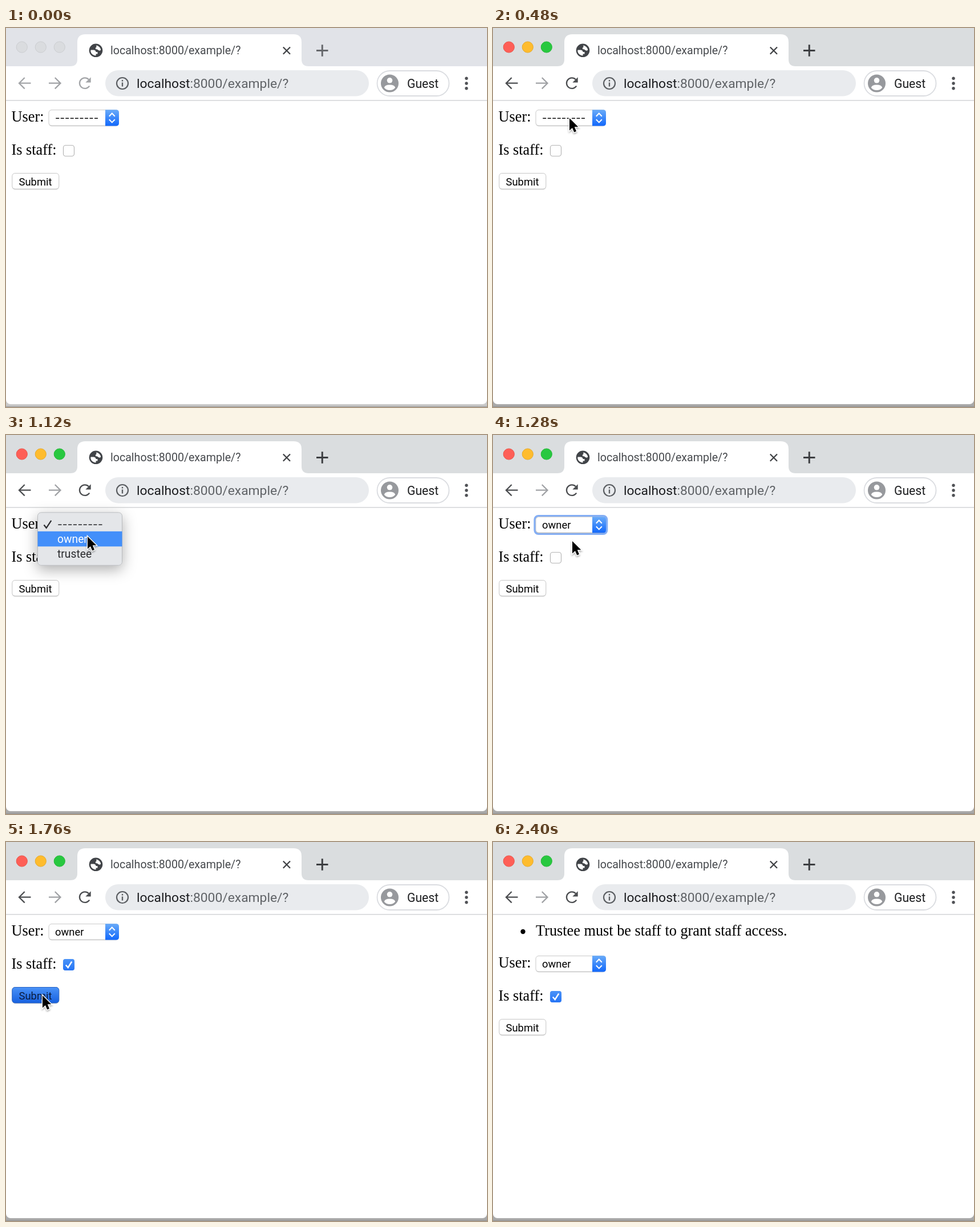
Write an HTML page that moves like this. It is 843 by 664 pixels and loops after 2.56 s.

```html
<!DOCTYPE html>
<html lang="en">
<head>
<meta charset="utf-8">
<title>Form validation</title>
<style>
  html, body { margin: 0; width: 100%; height: 100%; overflow: hidden; background: #fff; }
  svg { display: block; width: 843px; height: 664px; }
  text { font-family: Roboto, sans-serif; white-space: pre; }
  .serif { font: 26.3px "Liberation Serif", serif; }
  .field { font-size: 18.4px; }
  .item { font-size: 19.3px; fill: #2b2c2f; }
  .dash { font-family: Inter, sans-serif; }
  .line { fill: none; stroke-linecap: butt; stroke-linejoin: miter; }
  .dim { --strip: #e1e3e8; --nav: #a3a5a8; --plus: #66686c; --edge: #c9c9c9; }
  .lit { --strip: #dadddf; --nav: #4b4d50; --plus: #3c3e41; --edge: #a9a9a9; }
</style>
</head>
<body>
<svg id="stage" class="dim" viewBox="0 0 843 664">
  <defs>
    <linearGradient id="blue" x2="0" y2="1"><stop stop-color="#69abf9"/><stop offset="1" stop-color="#1268fb"/></linearGradient>
    <linearGradient id="tick" x2="0" y2="1"><stop stop-color="#4a93f8"/><stop offset="1" stop-color="#2574f5"/></linearGradient>
    <linearGradient id="press" x2="0" y2="1"><stop stop-color="#4a92f7"/><stop offset="1" stop-color="#1761e0"/></linearGradient>
    <filter id="lift" x="-50%" y="-50%" width="200%" height="220%"><feDropShadow dx="0" dy="7" stdDeviation="12" flood-opacity=".32"/></filter>
    <filter id="soft" x="-50%" y="-50%" width="200%" height="200%"><feDropShadow dx="0" dy="2" stdDeviation="1.5" flood-opacity=".35"/></filter>
    <clipPath id="win"><rect y="-9" width="843" height="668" rx="8"/></clipPath>
  </defs>

  <rect width="843" height="664" fill="var(--edge)"/>
  <rect y="662.5" width="843" height="1.5" fill="#8d8d8d" opacity=".6"/>
  <rect y="-9" width="843" height="668" rx="8" fill="#fff"/>

  <g clip-path="url(#win)">
    <rect width="843" height="67" fill="var(--strip)"/>
    <path d="M113 67Q125 67 125 55V25Q125 11 139 11H504Q518 11 518 25V55Q518 67 530 67Z" fill="#fff"/>
    <rect y="126" width="843" height="1.8" fill="#dadbdd"/>
  </g>
  <g id="lights"></g>

  <circle cx="157.5" cy="39.3" r="11.8" fill="#414448"/>
  <path d="M148.5 38.5H154Q157.5 39 157.5 42H160.5V45.5H157.5V48.5Q150 48 148.3 41ZM158 30.5Q164.5 31.5 166.3 38Q165 41 162 39Q160.5 37 157 37V34.5Q159.5 34 158 30.5Z" fill="#fff"/>
  <text x="183" y="46" font-size="19.6" fill="#46494d">localhost:8000/example/?</text>
  <path class="line" d="M485.8 33.5L498 45.7M498 33.5L485.8 45.7" stroke="#414346" stroke-width="2.3"/>
  <path class="line" d="M544 39.5H564.5M554.25 29.3V49.7" stroke="var(--plus)" stroke-width="3"/>

  <g class="line" stroke-width="2.3">
    <path d="M43.5 96.7H23.5M32.7 87L23 96.7L32.7 106.4" stroke="var(--nav)"/>
    <path d="M75 96.7H95M85.8 87L95.5 96.7L85.8 106.4" stroke="#a0a2a5"/>
    <path d="M146.2 101.5A9.3 9.3 0 1 1 145 90.2" stroke="var(--nav)"/>
  </g>
  <path d="M148.7 86.3V95.6H139.4Z" fill="var(--nav)"/>

  <rect x="174" y="74" width="462" height="45.5" rx="22.75" fill="#e9ebee"/>
  <circle class="line" cx="204" cy="97" r="10" stroke="#5b5e62" stroke-width="2.2"/>
  <path class="line" d="M204 95.5V102.5M204 91V93.4" stroke="#5b5e62" stroke-width="2.3"/>
  <text x="229" y="105" font-size="22.85" fill="#606367"><tspan fill="#1c1d20">localhost</tspan>:8000/example/?</text>

  <rect x="650.5" y="75" width="126" height="44" rx="22" fill="#fff" stroke="#dadce0" stroke-width="1.8"/>
  <circle cx="672.5" cy="97" r="15.5" fill="#97999d"/>
  <circle cx="672.5" cy="91.8" r="4.8" fill="#fff"/>
  <path d="M662.8 104.5Q664 99.5 672.5 99.5T682.2 104.5Q678.5 109 672.5 109T662.8 104.5Z" fill="#fff"/>
  <text x="703" y="104.8" font-size="21.2" fill="#1d1e20">Guest</text>
  <g fill="#505256"><circle cx="807" cy="88.3" r="2.7"/><circle cx="807" cy="97" r="2.7"/><circle cx="807" cy="105.7" r="2.7"/></g>

  <g id="error">
    <circle cx="52.5" cy="157" r="4.2"/>
    <text class="serif" x="75" y="164">Trustee must be staff to grant staff access.</text>
  </g>

  <g id="form">
    <text class="serif" x="9.5" y="164">User:</text>
    <rect id="ring" x="73.2" y="141.7" width="126.3" height="31.6" rx="6.5" fill="#fff" stroke="#84aef4" stroke-width="3.6"/>
    <rect x="75" y="144.5" width="122.5" height="27.8" rx="5" fill="#a9a9a9" opacity=".55"/>
    <rect x="75" y="143.6" width="122.5" height="27.4" rx="5" fill="#fff" stroke="#c9c9c9"/>
    <path d="M174 143.2H193Q198 143.2 198 148.2V166.5Q198 171.5 193 171.5H174Z" fill="url(#blue)"/>
    <path class="line" d="M180.8 154.7L185.8 149.5L190.8 154.7M180.8 160.2L185.8 165.4L190.8 160.2" stroke="#fff" stroke-width="2"/>
    <text id="empty" class="field dash" x="86" y="164">---------</text>
    <text id="picked" class="field" x="86" y="164">owner</text>

    <text class="serif" x="9.5" y="221.5">Is staff:</text>
    <rect x="100.5" y="205.5" width="19" height="19" rx="4" fill="#fff" stroke="#b5b5b5" stroke-width="1.2"/>
    <g id="checked">
      <rect x="100" y="205" width="20" height="20" rx="4" fill="url(#tick)"/>
      <path class="line" d="M104.8 215.5L108.7 220L115.3 209.5" stroke="#fff" stroke-width="2.4"/>
    </g>

    <rect x="10.8" y="255.5" width="82" height="27.7" rx="5" fill="#a9a9a9" opacity=".55"/>
    <rect x="10.8" y="254.5" width="82" height="27.5" rx="5" fill="#fff" stroke="#c6c6c6"/>
    <rect id="pressed" x="10.8" y="254.5" width="82" height="27.5" rx="5" fill="url(#press)" stroke="#2763c4"/>
    <text id="label" class="field" x="22.5" y="275.7">Submit</text>
  </g>

  <g id="menu">
    <rect x="55.5" y="135.8" width="148" height="92.5" rx="6" fill="#e4e6e9" stroke="#b9bbbe" filter="url(#lift)"/>
    <rect id="bar" x="55.5" width="148" height="26.5" fill="#438ffa"/>
    <path id="mark" class="line" d="M66.5 157.5L70.7 162.8L79.3 149.8" stroke-width="2.2"/>
    <text class="item dash" x="90" y="163">---------</text>
    <text class="item" x="90" y="188.7">owner</text>
    <text class="item" x="90" y="215">trustee</text>
  </g>

  <path id="cursor" d="M0 0V21.5L5 16.9L8.2 24.5L12 22.9L8.8 15.3H15.3Z" fill="#000" stroke="#fff" stroke-width="2.6" paint-order="stroke" filter="url(#soft)"/>
</svg>
<script>
const LOOP = 2560;
const $ = id => document.getElementById(id);

// [start ms, cursor position or null, page state]
const steps = [
  [0, null, {}],
  [160, [81, 52], {}],
  [320, [131, 152], {}],
  [480, [134, 158], { lit: 1 }],
  [640, [135, 158], { lit: 1, row: 1 }],
  [800, [136, 159], { lit: 1, row: 1 }],
  [960, [143, 178], { lit: 1, row: 2 }],
  [1280, [139, 186], { lit: 1, picked: 1, ring: 1 }],
  [1440, [108, 209], { lit: 1, picked: 1, ring: 1 }],
  [1600, [97, 237], { lit: 1, picked: 1, checked: 1 }],
  [1760, [64, 269], { lit: 1, picked: 1, checked: 1, pressed: 1 }],
  [1920, [64, 269], { lit: 1, picked: 1, checked: 1, error: 1 }],
  [2240, null, { lit: 1, picked: 1, checked: 1, error: 1 }]
];

const lamps = ["#fe5f57", "#febc2e", "#28c840"];
const rims = ["#e9544b", "#e6a92a", "#23b836"];
$("lights").innerHTML = lamps.map((_, i) =>
  `<circle cx="${27.8 + 33 * i}" cy="33.5" r="9.6"/>`).join("");

const show = (id, on) => $(id).style.display = on ? "" : "none";

function draw(at, s) {
  $("stage").setAttribute("class", s.lit ? "lit" : "dim");
  [...$("lights").children].forEach((dot, i) => {
    dot.setAttribute("fill", s.lit ? lamps[i] : "#dadcdf");
    dot.setAttribute("stroke", s.lit ? rims[i] : "#cbcdd0");
  });
  for (const id of ["ring", "picked", "checked", "pressed", "error"]) show(id, s[id]);
  show("empty", !s.picked);
  show("menu", s.row);
  show("cursor", at);
  $("form").setAttribute("transform", `translate(0 ${s.error ? 56 : 0})`);
  $("label").setAttribute("fill", s.pressed ? "#0b1c3d" : "#000");
  if (s.row) {
    $("bar").setAttribute("y", 142.3 + 26.5 * (s.row - 1));
    $("mark").setAttribute("stroke", s.row === 1 ? "#fff" : "#2b2c2f");
    document.querySelectorAll(".item").forEach((t, i) =>
      t.style.fill = i === s.row - 1 ? "#fff" : "");
  }
  if (at) $("cursor").setAttribute("transform", `translate(${at})`);
}

let last;
const start = performance.now();
function tick() {
  const t = (performance.now() - start) % LOOP;
  const step = steps.findLast(s => s[0] <= t);
  if (step !== last) draw(step[1], step[2]);
  last = step;
  requestAnimationFrame(tick);
}
tick();
</script>
</body>
</html>
```
